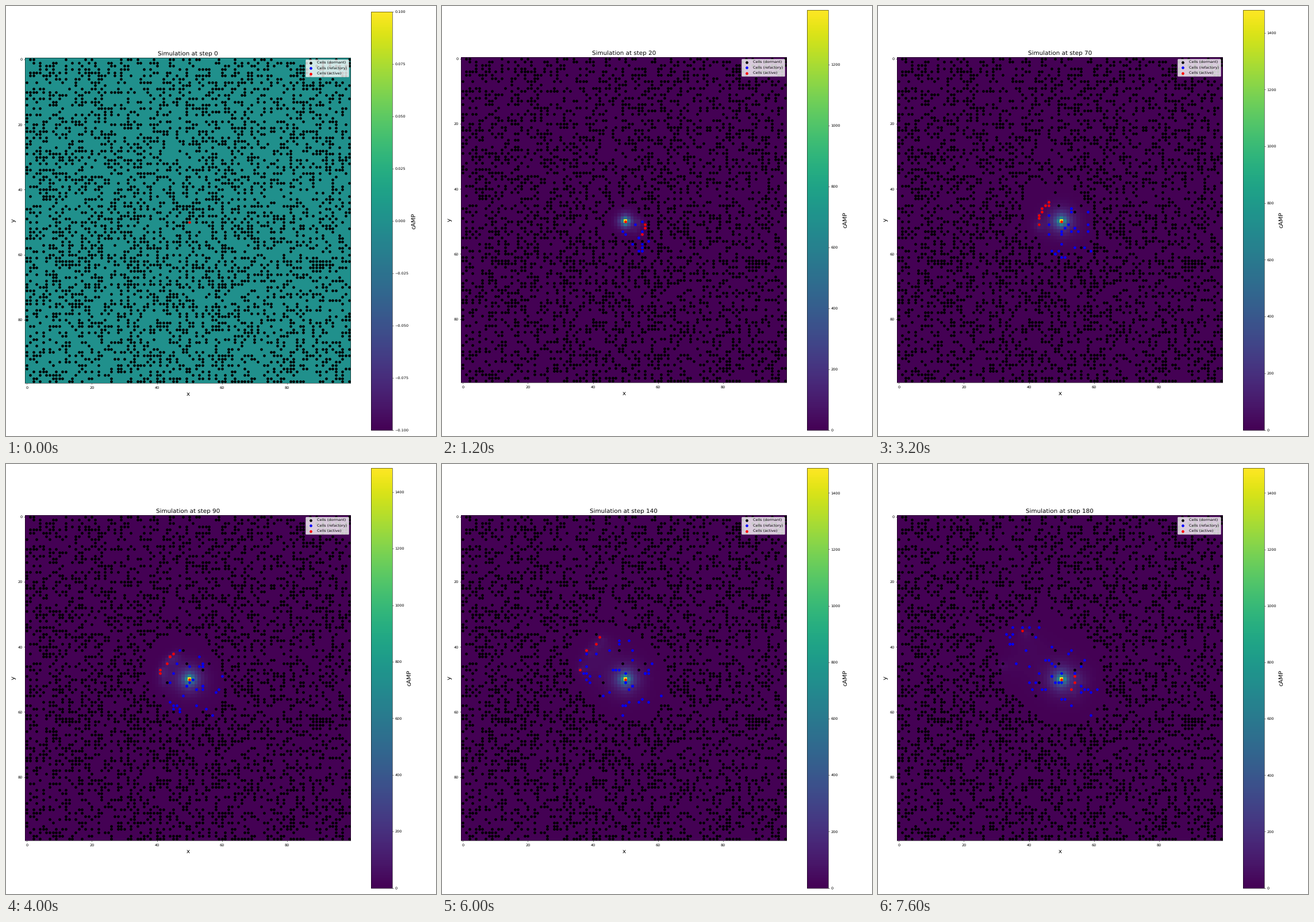
These frames come from a looping animation (748 by 748 pixels, 8000 ms). A matplotlib script:

```python
import numpy as np
import matplotlib.pyplot as plt
from matplotlib.animation import FuncAnimation

SIZE, N, FRAMES, INTERVAL = 748, 100, 20, 400
LAST = 180
CENTER = np.array([50, 50])
DIFFUSION, DECAY, EMISSION = 0.14, 0.02, 468

plt.rcParams.update({"font.family": "DejaVu Sans", "text.hinting": "none",
                     "xtick.major.pad": 5})
fig = plt.figure(figsize=(16, 16), dpi=SIZE / 16, facecolor="white")

# Dormant cells on random lattice sites
rng = np.random.default_rng(12)
sites = rng.choice(N * N, 3400, replace=False)
cells = np.column_stack([sites % N, sites // N])
cells = cells[np.any(cells != CENTER, axis=1)]
stays = rng.random(len(cells)) < 0.04

# Refractory cells as points in a unit disc that slowly turns
MOBILE = 46
radii = np.sqrt(rng.random(MOBILE))
angles = rng.random(MOBILE) * 2 * np.pi

# Waves of active cells: birth, life, count, angle, spread, radius, speed
WAVES = [
    (10, 30, 3, 30, 60, 4, 0.25),
    (40, 40, 2, 170, 20, 6, 0.05),
    (70, 125, 7, 212, 60, 7, 0.11),
    (150, 100, 3, 25, 90, 8, -0.12),
]


def step_at(frame):
    return frame if frame < 2 else 10 * (frame - 1)


def peak_at(step):
    return 1488 - 4447 * np.exp(-0.028 * step) / (step + 3.24)


def active_at(step):
    points = [CENTER]
    for birth, life, count, angle, spread, radius, speed in WAVES:
        age = step - birth
        for i in range(count):
            if 0 <= age <= life * (i + 1) / count:
                turn = np.radians(angle + spread * ((0.618 * i + 0.1) % 1 - 0.5))
                reach = radius + speed * age
                points.append(CENTER + reach * np.array([np.cos(turn), np.sin(turn)]))
    return np.rint(points).astype(int)


def dormant_at(step):
    """Cells outside a tilted ellipse that grows around the center."""
    if step <= 1:
        return cells
    grown = step / LAST
    u, v = ((cells - CENTER + 3 * grown) / (17 * np.sqrt(grown))).T
    tilt = 0.35 * grown
    inside = u * u - 2 * tilt * u * v + v * v < 1 - tilt * tilt
    return cells[~inside | stays]


def refractory_at(step):
    if step <= 1:
        return np.empty((0, 2))
    grown = step / LAST
    count = int(MOBILE * np.sqrt(grown))
    turn = angles[:count] + 0.012 * step
    u, v = radii[:count] * np.cos(turn), radii[:count] * np.sin(turn)
    tilt = 0.65 * grown ** 2
    disc = np.column_stack([u, tilt * u + np.sqrt(1 - tilt * tilt) * v])
    points = np.rint(CENTER + 5 - 7 * grown + 15 * np.sqrt(grown) * disc)
    return points[np.any(points != CENTER, axis=1)]


def diffuse():
    """Concentration field at every shown step."""
    shown = [step_at(frame) for frame in range(FRAMES)]
    field = np.zeros((N, N))
    fields = [field]
    for step in range(1, LAST + 1):
        p = np.pad(field, 1, mode="edge")
        around = p[:-2, 1:-1] + p[2:, 1:-1] + p[1:-1, :-2] + p[1:-1, 2:]
        field = field + DIFFUSION * (around - 4 * field) - DECAY * field
        for x, y in active_at(step // 10 * 10)[1:]:
            field[y, x] += 0.06 * EMISSION
        field[tuple(CENTER)] += EMISSION
        if step in shown:
            fields.append(field * peak_at(step) / field.max())
    return fields


FIELDS = diffuse()


def pixel_axes(left, top, width, height):
    return fig.add_axes([left / SIZE, 1 - (top + height) / SIZE,
                         width / SIZE, height / SIZE])


def draw(frame):
    fig.clear()
    step = step_at(frame)
    first = frame == 0
    low, high = (-0.1, 0.1) if first else (0, peak_at(step))

    ax = pixel_axes(33.4, 90.2 if first else 89, 566, 566)
    image = ax.imshow(FIELDS[frame], cmap="viridis", vmin=low, vmax=high,
                      interpolation="nearest")
    groups = [(dormant_at(step), "black", "dormant"),
              (refractory_at(step), "blue", "refactory"),
              (active_at(step), "red", "active")]
    for points, color, state in groups:
        ax.scatter(points[:, 0], points[:, 1], c=color, label=f"Cells ({state})")
    ax.set(xlim=(-0.5, N - 0.5), ylim=(N - 0.5, -0.5),
           xticks=range(0, N, 20), yticks=range(0, N, 20))
    ax.set_title(f"Simulation at step {step}", fontsize=16)
    ax.set_xlabel("x", fontsize=16, labelpad=5)
    ax.set_ylabel("y", fontsize=16)
    ax.legend(loc="upper right", labelspacing=0.56)

    top = 10 if first else 7.3
    bar = fig.colorbar(image, cax=pixel_axes(635.2, top, 36.6, 737.5 - top))
    bar.set_label("cAMP", fontsize=16, labelpad=6)
    return []


anim = FuncAnimation(fig, draw, frames=FRAMES, interval=INTERVAL,
                     repeat=True, repeat_delay=0, blit=False)
plt.show()
```
